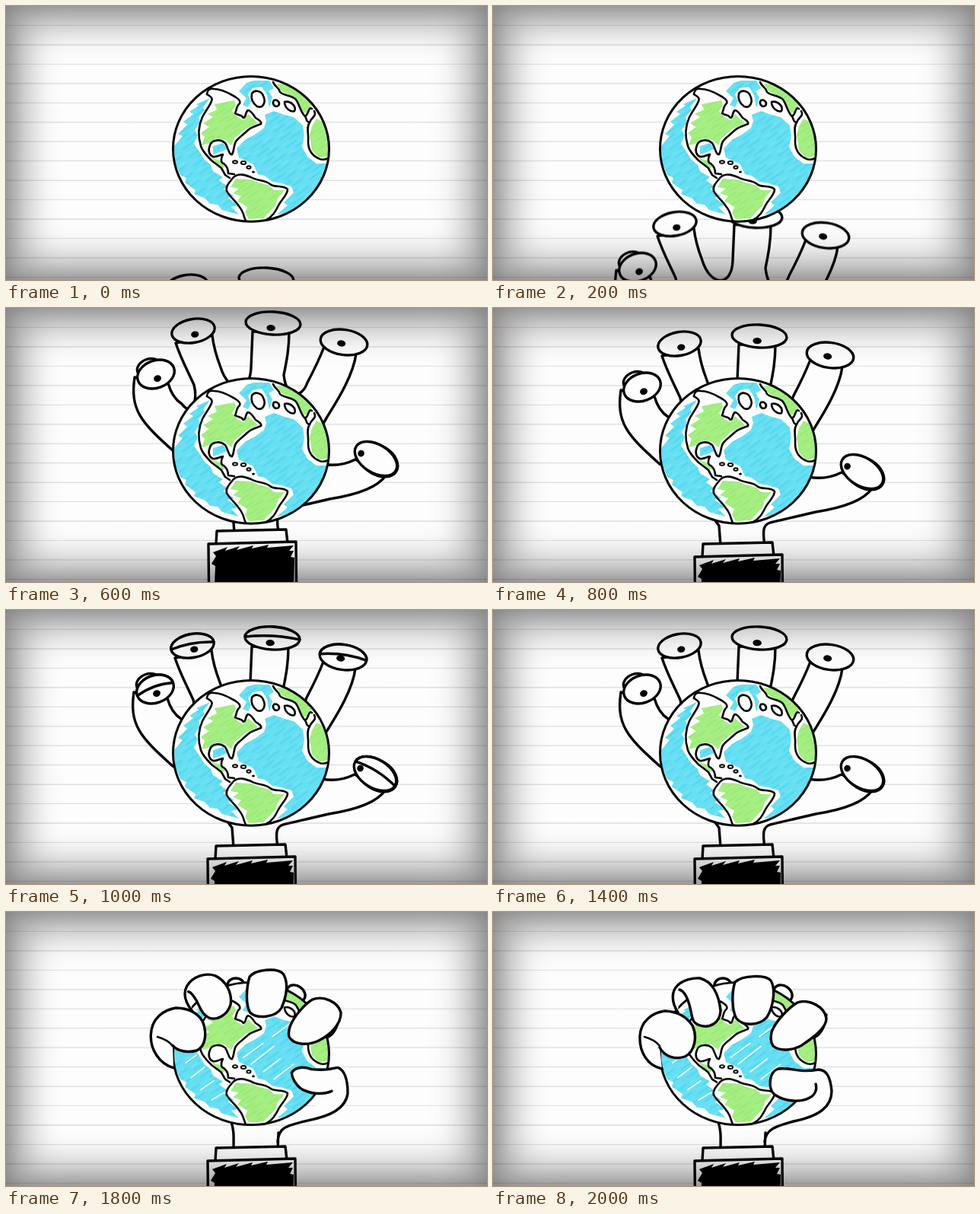
An HTML page without scripts for the animation above (2.2 s loop, 632 by 360 pixels).

```html
<!DOCTYPE html>
<html lang="en">
<head>
<meta charset="utf-8">
<title>Hand and globe</title>
<style>
html, body { margin: 0; width: 100%; height: 100%; overflow: hidden; }
.stage {
  position: relative; width: 632px; height: 360px; overflow: hidden;
  background: repeating-linear-gradient(transparent 0 24.4px, #dddde0 25px 25.6px, transparent 26.2px) 0 0 / 100% 25.45px #fefdfe;
  background: repeating-linear-gradient(transparent 0 23.6px, #dddde0 24.3px 25px, transparent 25.45px) 0 .9px #fefdfe;
}
.stage::after {
  content: ""; position: absolute; inset: 0;
  box-shadow: inset 0 0 48px 23px rgba(0,0,0,.38), inset 0 0 26px rgba(0,0,0,.22);
}
svg { display: block; }
path, ellipse { stroke-linecap: round; stroke-linejoin: round; }
.ink { fill: #fefdfe; stroke: #050505; stroke-width: 3.4; }
.line { fill: none; stroke: #050505; stroke-width: 2.6; }

/* every move lands on 100 ms steps of a 2.2 s loop */
.open, .rest, .grip, .globe, .out, .half, .shut, .tip { animation: 2.2s step-end infinite; }
.open { animation-name: rise, leave; }
.rest { animation-name: leave; }
.grip { animation-name: enter; }
.globe { animation-name: squash; transform-origin: 322px 92px; }
.half { animation-name: half; }
.shut { animation-name: shut; }
.out { animation-name: curl; }

@keyframes rise {
  0% { transform: translate(-8px, 322px); }
  4.54% { transform: translate(-8px, 322px); animation-timing-function: steps(3); }
  18.18% { transform: translate(-2px, 74px); }
  27.27% { transform: translate(1px, -17px); }
  31.81% { transform: translate(0, -6px); }
  36.36%, 100% { transform: translate(0, 0); }
}
@keyframes leave { 0% { visibility: visible; } 68.18%, 100% { visibility: hidden; } }
@keyframes enter { 0% { visibility: hidden; } 68.18%, 100% { visibility: visible; } }
@keyframes half {
  0% { visibility: hidden; }
  45.45% { visibility: visible; }
  50% { visibility: hidden; }
  54.54% { visibility: visible; }
  63.63%, 100% { visibility: hidden; }
}
@keyframes shut {
  0% { visibility: hidden; }
  50% { visibility: visible; }
  54.54%, 100% { visibility: hidden; }
}
@keyframes squash { 0% { transform: none; } 72.72%, 100% { transform: scaleY(.982); } }
@keyframes curl { 0% { transform: translate(var(--x), var(--y)); } 72.72%, 100% { transform: none; } }

/* the squeeze: each fingertip goes from resting to pressing in three steps */
.tip { animation-name: var(--squeeze); }
@keyframes index {
  0%, 77.26% { animation-timing-function: steps(3);
    d: path("M219 204C200 198 188 178 189 160C190 138 205 127 222 124C240 124 250 130 256 140C262 155 262 172 250 178C238 181 225 179 219 174"); }
  90.9%, 100% {
    d: path("M222 206C203 202 192 184 193 163C194 143 210 132 226 130C244 131 254 138 262 149C269 164 265 184 252 190C240 194 226 191 219 178"); }
}
@keyframes second {
  0%, 77.26% { animation-timing-function: steps(3);
    d: path("M246 130C236 119 232 108 235 98C243 82 262 76 276 82C290 90 298 106 293 118C287 130 274 138 264 134C257 129 254 124 250 119C246 113 240 107 237 106"); }
  90.9%, 100% {
    d: path("M243 132C234 118 234 104 243 96C249 90 262 86 272 87C288 91 297 108 299 130C298 146 285 153 272 149C262 146 262 140 260 130C257 116 252 104 245 102"); }
}
@keyframes middle {
  0%, 77.26% { animation-timing-function: steps(3);
    d: path("M321 82C327 71 356 68 364 77C372 90 368 106 363 120C356 134 330 136 321 128C315 118 317 96 321 82Z"); }
  90.9%, 100% {
    d: path("M318 92C328 83 358 82 365 90C372 102 368 125 360 138C350 150 328 150 320 140C313 128 314 104 318 92Z"); }
}
@keyframes fourth {
  0%, 77.26% { animation-timing-function: steps(3);
    d: path("M377 146C382 134 395 118 404 113C418 107 436 115 441 128C442 145 428 160 412 167C396 173 378 170 374 158C374 153 375 150 377 146Z"); }
  90.9%, 100% {
    d: path("M366 158C370 145 388 126 400 119C415 114 436 124 438 140C438 152 422 164 410 172C398 182 378 184 368 176C364 170 365 164 366 158Z"); }
}
@keyframes thumb {
  0%, 77.26% { animation-timing-function: steps(3);
    d: path("M357 302C358 284 362 281 395 274C425 268 447 260 451 240C452 222 449 208 440 203C432 205 425 210 415 207C402 198 388 191 378 197C372 206 373 222 381 230C395 240 415 243 430 240"); }
  90.9%, 100% {
    d: path("M357 302C358 284 375 281 395 275C430 268 445 255 445 235C443 215 438 208 428 207C400 212 395 204 375 206C362 210 361 232 370 240C385 250 405 250 416 244C424 240 426 232 424 226"); }
}
</style>
</head>
<body>
<div class="stage">
<svg width="632" height="360" viewBox="0 0 632 360">
  <defs>
    <pattern id="sea" width="37" height="13" patternUnits="userSpaceOnUse" patternTransform="rotate(-36)">
      <path fill="#66dff3" d="M0 0h37v13H0z"/>
      <path stroke="#4fd4ec" stroke-width="1.3" d="M3 3h17M14 9.5h19"/>
      <path stroke="#84e6f6" d="M22 5h10M2 11h8"/>
    </pattern>
    <pattern id="land" width="31" height="11" patternUnits="userSpaceOnUse" patternTransform="rotate(-32)">
      <path fill="#a5ee82" d="M0 0h31v11H0z"/>
      <path stroke="#94e271" stroke-width="1.2" d="M2 3h15M12 8h16"/>
    </pattern>
    <clipPath id="disc"><ellipse cx="322" cy="188" rx="102" ry="95"/></clipPath>

    <circle id="ball" class="ink" r="1" vector-effect="non-scaling-stroke"/>
    <path id="lid" class="ink" d="M-1 0A1 1 0 0 1 1 0Q0-.4-1 0Z" vector-effect="non-scaling-stroke"/>
    <path id="closed" class="ink" d="M-1 0A1 1 0 0 1 1 0Q0 1-1 0Z" vector-effect="non-scaling-stroke"/>

    <g id="arm">
      <path class="ink" d="M275 327L276 310L367 308L369 326Z"/>
      <path class="ink" d="M266 430L265 327L380 324L381 430Z"/>
      <path d="M271 430L274 356L269 353L275 343L271 338L290 331L287 336L306 330L302 335L324 329L322 333L344 328L342 332L377 329L371 336L377 336L373 344L378 345L376 430Z"/>
    </g>
  </defs>

  <g class="open">
    <path class="ink" d="M299 312L297 286C280 262 240 215 219 205C175 166 162 150 168 108L212 116C216 130 222 138 230 143C242 160 252 140 246 118C237 98 229 84 222 63L270 53C272 70 276 82 281 95C292 130 320 130 321 95L323 48L371 48C371 70 368 85 364 105C368 140 388 135 395 115C404 98 410 86 417 68L459 77C455 108 430 145 421 160C402 190 398 222 415 222C430 225 446 222 458 216L498 237C488 252 462 262 424 268C395 275 375 279 364 282C355 285 354 292 357 312"/>
    <use href="#arm"/>
    <ellipse class="ink" cx="187" cy="96" rx="16" ry="12" transform="rotate(-20 187 96)"/>
    <ellipse class="ink" cx="488" cy="217" rx="28" ry="19" transform="rotate(32 488 217)"/>
    <g transform="translate(196 104)rotate(-20)scale(25 18)">
      <use href="#ball"/><ellipse cy=".33" rx=".2" ry=".24"/>
      <use href="#lid" class="half"/><use href="#closed" class="shut"/>
    </g>
    <g transform="translate(245 47)rotate(-10)scale(28.5 15.5)">
      <use href="#ball"/><ellipse cx=".05" cy=".32" rx=".18" ry=".27"/>
      <use href="#lid" class="half"/><use href="#closed" class="shut"/>
    </g>
    <g transform="translate(350 37)rotate(3)scale(36 15)">
      <use href="#ball"/><ellipse cx="-.07" cy=".42" rx=".16" ry=".28"/>
      <use href="#lid" class="half"/><use href="#closed" class="shut"/>
    </g>
    <g transform="translate(443 62)rotate(8)scale(31 16.5)">
      <use href="#ball"/><ellipse cx="-.1" cy=".12" rx=".18" ry=".25"/>
      <use href="#lid" class="half"/><use href="#closed" class="shut"/>
    </g>
    <g transform="translate(485 215)rotate(32)scale(30.5 18.5)">
      <use href="#ball"/><ellipse cx="-.66" cy=".24" rx=".14" ry=".24"/>
      <use href="#lid" class="half"/><use href="#closed" class="shut"/>
    </g>
  </g>

  <g class="grip">
    <path class="ink" d="M296 276C300 288 299 296 299 312H357L358 290"/>
    <use href="#arm"/>
    <ellipse class="ink" cx="302" cy="96" rx="11" ry="9"/>
    <ellipse class="ink" cx="381" cy="107" rx="13" ry="10" transform="rotate(35 381 107)"/>
  </g>

  <g class="globe">
    <ellipse cx="322" cy="188" rx="102" ry="95" fill="#fefdfe"/>
    <g clip-path="url(#disc)">
      <g fill="url(#sea)">
        <path d="M268 121L250 129L253 131L241 139L246 142L233 152L238 156L226 168L232 171L221 184L222 205L229 222L237 226L235 232L249 242L247 247L262 253L268 260L278 261L284 268L306 274L296 264L306 262L291 252L300 250L285 240L292 238L280 229L285 225L272 217L269 209L260 201L254 191L247 181L252 170L248 163L255 152L253 146L261 137L259 133Z"/>
        <path d="M340 143L352 138L366 143L378 146L390 157L392 171L389 185L396 198L408 207L424 207L417 226L421 227L408 240L410 243L397 252L400 255L386 264L374 271L356 274L370 262L365 258L378 245L375 237L362 233L350 231L340 223L331 221L325 208L306 199L303 187L314 176L327 169L339 160L342 151Z"/>
        <path d="M306 112L316 101L326 98L346 98L352 108L345 112L350 120L346 134L343 117L336 106L324 108L318 116L322 125L318 133L311 130L316 121Z"/>
        <path class="rest" d="M272 184L285 180L291 188L281 192L272 195Z"/>
      </g>
      <g fill="url(#land)">
        <path d="M274 129L300 124L302 130L297 138L304 146L312 150L318 142L331 154L314 162L300 174L296 183L288 176L276 174L266 181L257 183L261 172L256 167L267 159L259 154L272 146L265 142L277 136Z"/>
        <path d="M269 199L281 203L288 211L284 213Z"/>
        <path d="M302 227L322 228L332 232L346 236L352 242L366 242L357 253L354 262L345 272L338 279L319 280L314 272L317 264L304 256L309 250L298 246L306 240L295 238Z"/>
        <path d="M355 102L370 103L388 113L402 130L398 138L391 141L384 128L374 118L362 112Z"/>
        <path d="M402 158L408 148L416 152L425 175L423 197L412 200L402 190L399 170Z"/>
      </g>
      <path class="grip" fill="none" stroke="#fefdfe" stroke-width="1.6" d="M312 193l26-19M322 202l30-24M338 212l22-17M352 222l26-20M350 165l24-18M236 200l14-10M243 220l18-14M256 236l17-12M270 250l16-10"/>
    </g>
    <g class="line">
      <path d="M264 116C269 119 272 121 270 125C268 131 262 138 258 146C253 157 252 171 256 184C258 191 264 197 270 203L278 209L283 213L288 222L294 226"/>
      <path d="M264 116C265 109 269 108 273 109C281 109 290 113 297 117C303 120 309 124 307 128C302 132 303 138 301 141C305 144 309 142 312 147C316 146 314 139 318 137C322 137 324 142 328 147C333 150 336 152 335 155C330 157 322 159 318 163C312 169 305 173 302 178C299 183 300 190 297 195C293 196 292 186 288 180C281 174 270 176 268 183C265 190 267 196 272 198C277 199 282 195 285 195C282 200 282 206 286 207C290 210 292 214 292 220L300 221"/>
      <path d="M315 282C312 277 313 271 306 263C302 256 294 251 290 243C288 237 294 231 299 225C306 219 314 222 322 225C330 230 340 228 347 234C352 239 366 235 370 241C370 248 362 254 358 262C354 270 350 277 342 281"/>
      <path d="M323 115C327 109 336 112 338 118C342 126 338 135 330 132C326 129 321 124 323 115Z"/>
      <path d="M352 124C356 122 361 127 358 131C353 134 349 128 352 124Z"/>
      <path d="M366 126C374 124 382 132 379 138C374 140 366 134 366 126Z"/>
      <path d="M351 100C353 106 358 106 360 113C364 118 376 117 381 123C386 130 387 140 393 145C396 150 394 152 399 153C401 146 409 145 405 138M393 145C398 142 397 132 402 135"/>
      <path d="M399 153C394 160 398 168 397 178C397 188 402 196 410 200C415 203 419 202 423 200"/>
      <g stroke-width="1.9">
        <ellipse cx="301" cy="205" rx="3" ry="1.8"/>
        <ellipse cx="312" cy="206" rx="3.2" ry="2"/>
        <ellipse cx="319" cy="212" rx="2.6" ry="1.8"/>
        <ellipse cx="325" cy="218" rx="1" ry=".6"/>
      </g>
      <ellipse cx="322" cy="187.8" rx="102.5" ry="95.4" stroke-width="3"/>
    </g>
  </g>

  <g class="grip">
    <g class="out" style="--x:-12px;--y:-12px">
      <path class="ink tip" style="--squeeze:index"/>
      <path class="line" d="M199 164C206 166 214 169 219 176"/>
    </g>
    <g class="out" style="--x:-8px;--y:-16px"><path class="ink tip" style="--squeeze:second"/></g>
    <g class="out" style="--x:1px;--y:-20px"><path class="ink tip" style="--squeeze:middle"/></g>
    <g class="out" style="--x:12px;--y:-13px">
      <path class="ink" d="M438 135C436 150 432 160 422 165L410 160"/>
      <path class="ink tip" style="--squeeze:fourth"/>
    </g>
    <g class="out" style="--x:10px;--y:-2px"><path class="ink tip" style="--squeeze:thumb"/></g>
  </g>
</svg>
</div>
</body>
</html>
```
